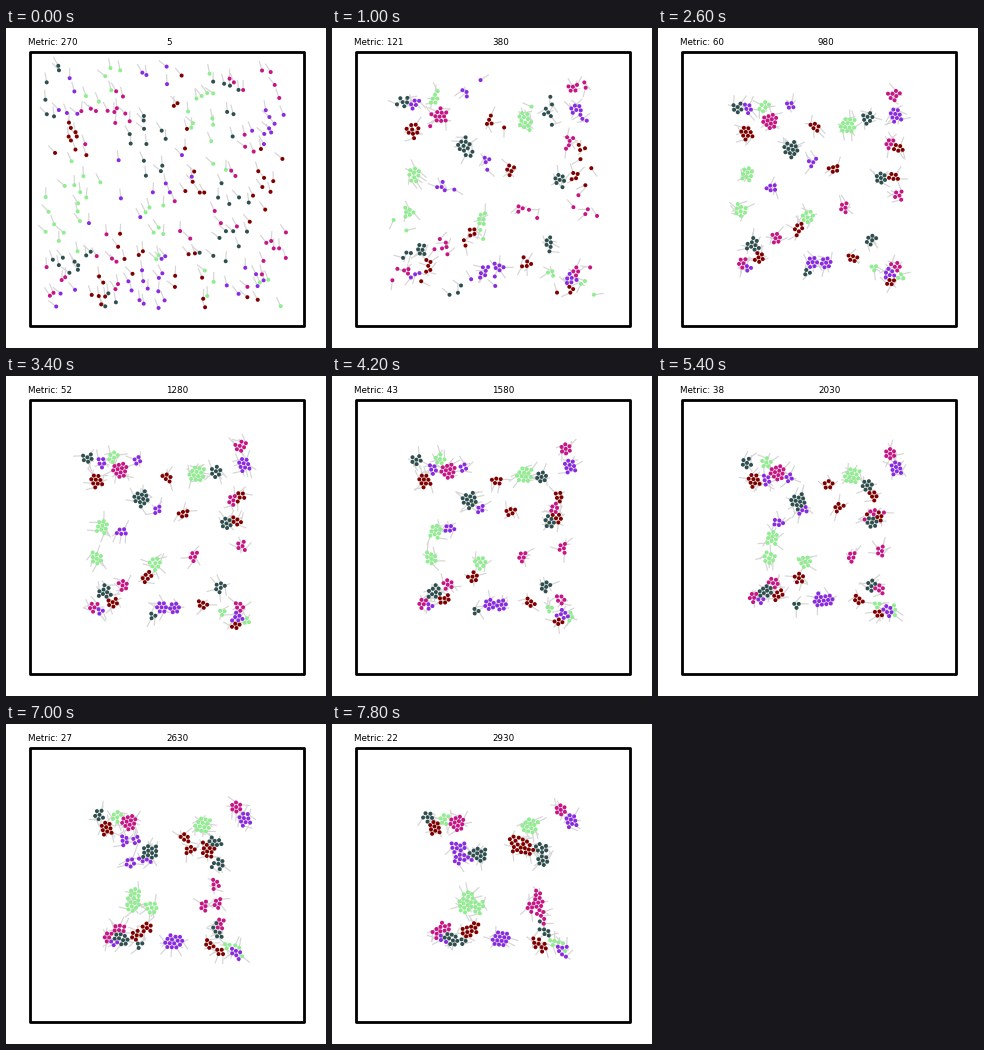
Animation of 320x320 px, one loop 8000 ms. Source, as a matplotlib script:

```python
import numpy as np
import matplotlib.pyplot as plt
from matplotlib.animation import FuncAnimation
from matplotlib.collections import LineCollection
from matplotlib.patches import Rectangle

SIZE, DPI = 320, 100
PX = 72 / DPI             # points per pixel
CENTER = SIZE / 2
FRAMES, INTERVAL = 40, 200
TICKS = 75                # simulation ticks per frame
SETTLED = 13              # frame by which the first clusters have formed
GAP = 4.5                 # closest distance between robots
TAIL = 10

GREEN, VIOLET, PINK = "#90ee90", "#8a2be2", "#c71585"
SLATE, MAROON = "#2f4f4f", "#800000"

rng = np.random.default_rng(12)
colors, first, last = [], [], []


def gather(color, count, end, *origins):
    """Clusters at the origins drift into one cluster around end."""
    origins = np.array(origins, float)
    which = np.arange(count) * len(origins) // count
    spread = 0.15 * (origins - origins.mean(axis=0))
    colors.extend([color] * count)
    first.extend(origins[which])
    last.extend((end + spread)[which])


gather(GREEN, 25, (138, 180), (89, 146), (83, 182), (150, 189))
gather(GREEN, 13, (198, 102), (190, 97))
gather(GREEN, 6, (112, 96), (106, 78))
gather(GREEN, 6, (224, 220), (216, 240), (243, 249))

gather(VIOLET, 18, (128, 128), (90, 80), (132, 77), (113, 160), (155, 134))
gather(VIOLET, 14, (169, 215), (154, 235), (168, 235))
gather(VIOLET, 9, (239, 97), (238, 87))
gather(VIOLET, 6, (232, 227), (232, 246))
gather(VIOLET, 3, (111, 208), (90, 240))

gather(PINK, 20, (205, 182), (186, 179), (232, 116), (241, 168), (238, 238))
gather(PINK, 12, (125, 99), (112, 93))
gather(PINK, 11, (109, 207), (118, 210), (84, 235))
gather(PINK, 7, (229, 86), (236, 67))

gather(SLATE, 14, (210, 131), (210, 90), (223, 150))
gather(SLATE, 12, (147, 131), (133, 121))
gather(SLATE, 9, (119, 216), (95, 217))
gather(SLATE, 6, (96, 93), (79, 80))
gather(SLATE, 6, (214, 208), (213, 212))
gather(SLATE, 3, (130, 217), (149, 244))

gather(MAROON, 20, (189, 121), (157, 99), (176, 141), (240, 120), (236, 149))
gather(MAROON, 12, (138, 206), (141, 200), (101, 230))
gather(MAROON, 9, (103, 104), (88, 105))
gather(MAROON, 9, (208, 221), (195, 230), (233, 254))

first, last = np.array(first), np.array(last)
N = len(colors)


def home(f):
    """Cluster centres: slow contraction at first, then drift and merging."""
    if f < SETTLED:
        return CENTER + (first - CENTER) * (1 + 0.12 * (1 - f / SETTLED))
    u = (f - SETTLED) / (FRAMES - 1 - SETTLED)
    return first + (last - first) * u


def scatter_start():
    """Uniform points, swapped until each robot starts near its cluster."""
    pts = rng.uniform((39, 37), (281, 281), (N, 2))
    goal = CENTER + (first - CENTER) * 1.25
    cost = ((goal[:, None] - pts[None]) ** 2).sum(-1)
    slot = np.arange(N)
    for i, j in rng.integers(0, N, (60000, 2)):
        a, b = slot[i], slot[j]
        if cost[i, b] + cost[j, a] < cost[i, a] + cost[j, b]:
            slot[i], slot[j] = b, a
    return pts[slot]


def separate(pos, rounds):
    for _ in range(rounds):
        diff = pos[:, None] - pos[None]
        dist = np.sqrt((diff ** 2).sum(-1)) + 1e-6
        push = np.clip(GAP - dist, 0, None) / dist * 0.4
        np.fill_diagonal(push, 0)
        pos = pos + (diff * push[..., None]).sum(1)
    return pos


def simulate(steps=6):
    start = separate(scatter_start(), 4)
    arrive = 4 + rng.exponential(2.5, N)      # a few robots straggle
    pos, goal, out = start, start, [start]
    for f in range(1, FRAMES):
        pos = pos + rng.normal(0, 0.5, (N, 2))
        for s in range(steps):
            t = f - 1 + (s + 1) / steps
            u = np.clip(t / arrive, 0, 1)[:, None]
            new = start + (home(t) - start) * u
            pos = pos + (new - goal) + 0.04 * (new - pos)
            pos = separate(pos, 3)
            goal = new
        pos = separate(pos, 4)
        out.append(pos)
    return out


places = simulate()
heading = np.radians(rng.uniform(85, 145, N))
spin = rng.uniform(-3, 3, N)

fig = plt.figure(figsize=(SIZE / DPI, SIZE / DPI), dpi=DPI, facecolor="white")
ax = fig.add_axes([0, 0, 1, 1])
ax.set(xlim=(0, SIZE), ylim=(SIZE, 0))
ax.axis("off")
ax.add_patch(Rectangle((23.5, 23.5), 274, 274, fill=False, ec="black",
                       lw=2.8 * PX, joinstyle="round"))

tails = LineCollection([], colors="#d6d6d6", linewidths=1.2 * PX, zorder=2)
ax.add_collection(tails)
dots = ax.scatter(*places[0].T, s=(4 * PX) ** 2, c=colors, linewidths=0, zorder=3)

style = dict(family="DejaVu Sans", size=8.8 * PX, color="black", va="baseline")
metric = ax.text(22.5, 16.6, "", **style)
clock = ax.text(160, 16.6, "", **style)


def draw(f):
    pos = places[f]
    angle = heading + spin * f
    tip = pos + TAIL * np.column_stack([np.cos(angle), -np.sin(angle)])
    tails.set_segments(np.stack([pos, tip], axis=1))
    dots.set_offsets(pos)
    value = np.interp(f, [0, 5, 13, 21, 27, 31, 39], [270, 121, 60, 43, 38, 32, 22])
    metric.set_text(f"Metric: {round(value)}")
    clock.set_text(str(5 + TICKS * f))
    return tails, dots, metric, clock


anim = FuncAnimation(fig, draw, frames=FRAMES, interval=INTERVAL, repeat=True)
plt.show()
```
